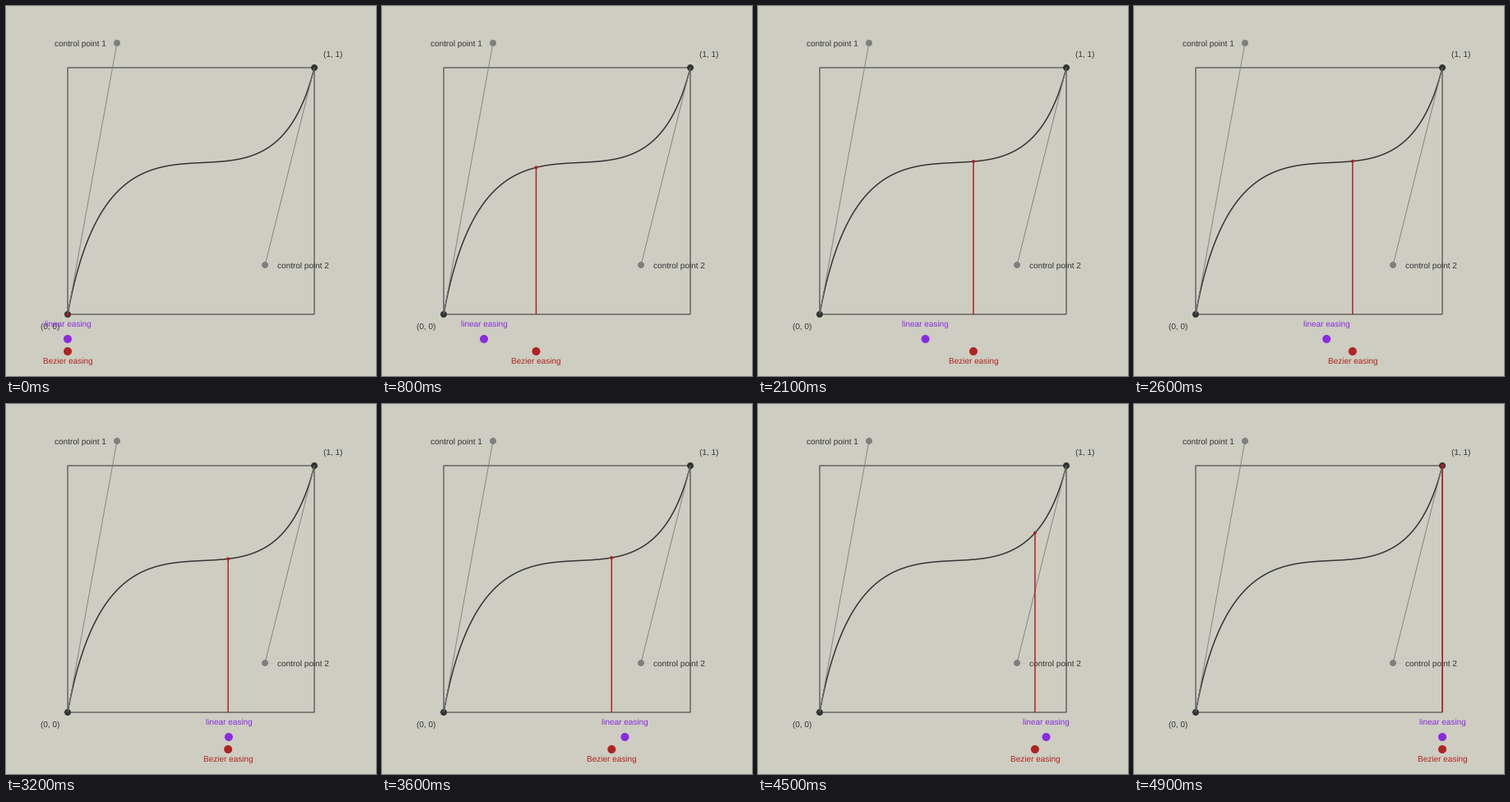
Recreate the animation shown at these times as a matplotlib script. Size 450x450 px, loop 5 s.

```python
import numpy as np
import matplotlib.pyplot as plt
from matplotlib.animation import FuncAnimation
from matplotlib.patches import Circle, Rectangle

SIZE, DPI = 450, 72  # at 72 dpi one point is one pixel
FRAMES, INTERVAL = 50, 100
LEFT, BOTTOM, SIDE = 75, 375, 300
CONTROLS = np.array([(0, 0), (0.2, 1.1), (0.8, 0.2), (1, 1)])

BACKGROUND = "#cdcdc1"
DARK = "#333333"
GRAY = "#7f7f7f"
RED = "#b22222"
VIOLET = "#8a2be2"

plt.rcParams.update({
    "path.snap": False,
    "font.family": "Liberation Sans",
    "font.size": 10,
    "text.hinting": "none",
})


def bezier(t):
    t = np.asarray(t, float)[..., None]
    u = 1 - t
    p0, p1, p2, p3 = CONTROLS
    return u**3 * p0 + 3 * t * u**2 * p1 + 3 * t**2 * u * p2 + t**3 * p3


def to_stage(points):
    return np.asarray(points) * (SIDE, -SIDE) + (LEFT, BOTTOM)


fig = plt.figure(figsize=(SIZE / DPI, SIZE / DPI), dpi=DPI, facecolor=BACKGROUND)
ax = fig.add_axes([0, 0, 1, 1])
ax.set(xlim=(0, SIZE), ylim=(SIZE, 0))
ax.axis("off")


def dot(center, radius, color, z):
    return ax.add_patch(Circle(center, radius, fc=color, ec="none", zorder=z))


def line(points, color, width, z):
    x, y = np.transpose(points)
    return ax.plot(x, y, color=color, lw=width, zorder=z,
                   solid_capstyle="butt")[0]


def label(x, y, text, color=DARK, ha="center", z=5):
    return ax.text(x, y, text, color=color, ha=ha, va="baseline", zorder=z)


start, handle1, handle2, end = to_stage(CONTROLS)

ax.add_patch(Rectangle((LEFT, BOTTOM - SIDE), SIDE, SIDE,
                       fill=False, ec=DARK, lw=1, zorder=1))
line(to_stage(bezier(np.linspace(0, 1, 200))), DARK, 1.5, 2)
for anchor, handle in ((start, handle1), (end, handle2)):
    dot(anchor, 4, DARK, 3)
    line((anchor, handle), GRAY, 0.9, 4)
    dot(handle, 4, GRAY, 4)

label(53.5, 393, "(0, 0)")
label(397.5, 62, "(1, 1)")
label(122, 49, "control point 1", ha="right")
label(330, 319, "control point 2", ha="left")

stem = line((start, start), RED, 1.5, 6)
tip = dot(start, 2, RED, 6)
linear_dot = dot((LEFT, 405), 5, VIOLET, 6)
linear_label = label(LEFT, 390, "linear easing", VIOLET, z=7)
eased_dot = dot((LEFT, 420), 5, RED, 6)
eased_label = label(LEFT, 435, "Bezier easing", RED, z=7)


def update(frame):
    t = frame / (FRAMES - 1)
    linear_x = LEFT + SIDE * t
    # The eased height serves as the parameter along the curve.
    x, y = to_stage(bezier(bezier(t)[1]))

    stem.set_data([x, x], [BOTTOM, y])
    tip.center = (x, y)
    linear_dot.center = (linear_x, 405)
    linear_label.set_x(linear_x)
    eased_dot.center = (x, 420)
    eased_label.set_x(x)
    return stem, tip, linear_dot, linear_label, eased_dot, eased_label


animation = FuncAnimation(fig, update, frames=FRAMES, interval=INTERVAL,
                          repeat=True, repeat_delay=0)
plt.show()
```
